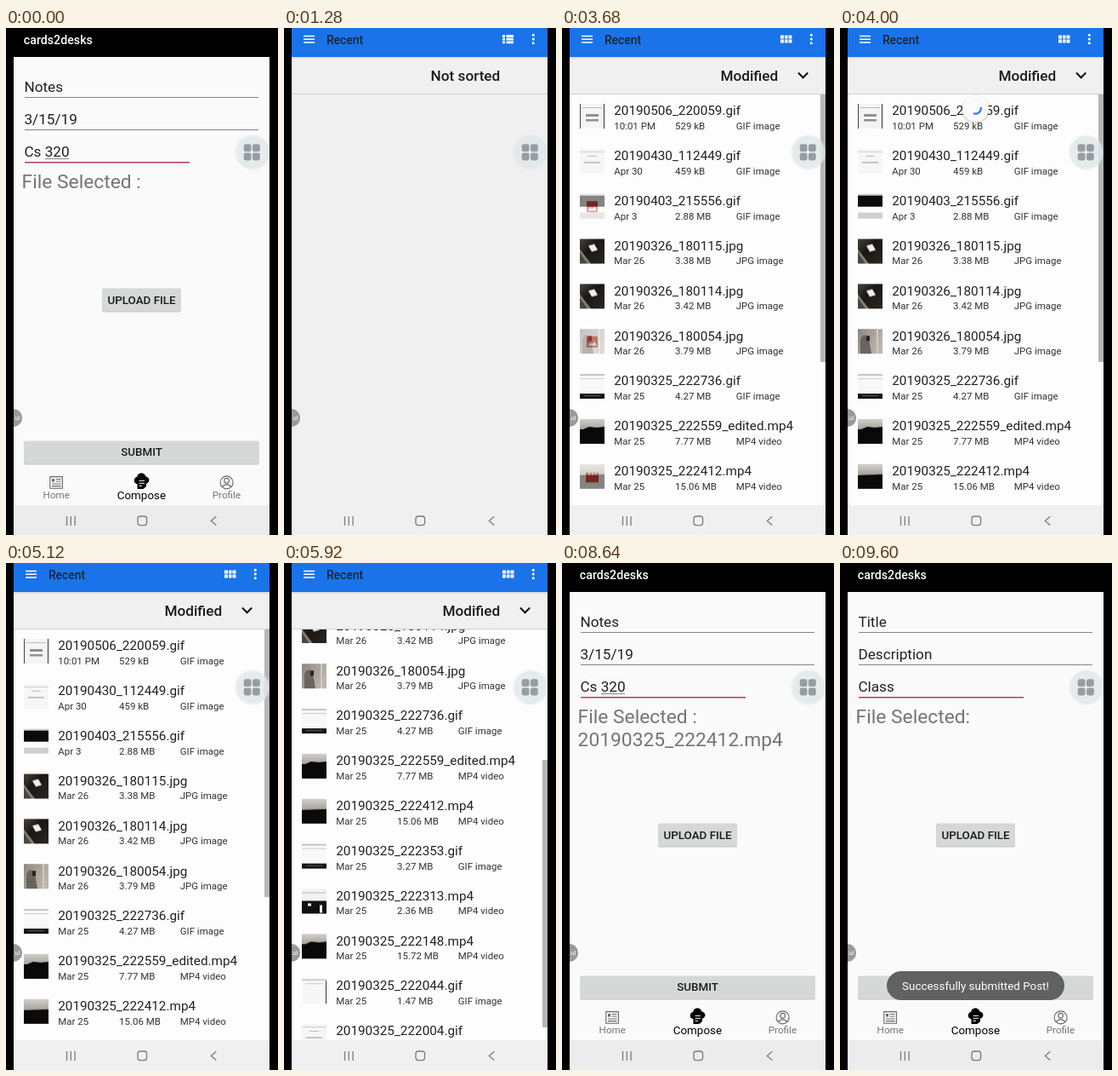
An HTML page that plays this animation: 320x595 px, repeating every 9.76 s.

```html
<!DOCTYPE html>
<html lang="en">
<head>
<meta charset="utf-8">
<title>Upload a file</title>
<style>
html, body { margin: 0; width: 100%; height: 100%; overflow: hidden; background: #000; }
svg { display: block; width: 100vw; height: 100vh; }
text { font-family: Roboto, "Noto Sans", sans-serif; white-space: pre; }
.mid { text-anchor: middle; }
.end { text-anchor: end; }
.med { font-weight: 500; }
.field { font-size: 17.2px; fill: #212121; }
.big { font-size: 22.8px; fill: #757575; }
.btn { font-size: 13.4px; font-weight: 500; fill: #1c1c1c; text-anchor: middle; }
.tab { font-size: 11.7px; fill: #757575; text-anchor: middle; }
.sort { font-size: 17.2px; font-weight: 500; fill: #1c1c1c; text-anchor: end; }
.name { font-size: 15.3px; fill: #212121; }
.meta { font-size: 11.5px; fill: #333; }

/* One loop is 61 ticks of 160 ms. */
.a { animation: 9.76s step-end infinite; animation-name: var(--k); }

@keyframes press {
  0% { opacity: 0; transform: scale(.3, 1); }
  1.63% { opacity: .08; transform: scale(.5, 1); }
  3.27% { opacity: .12; transform: scale(.8, 1); }
  4.91% { opacity: .14; transform: none; }
  6.55%, 100% { opacity: 0; }
}
@keyframes picker {
  0% { opacity: 0; transform: translateY(60px); }
  6.55% { opacity: .2; transform: translateY(40px); }
  8.19% { opacity: .45; transform: translateY(22px); }
  9.83% { opacity: .7; transform: translateY(10px); }
  11.47% { opacity: .88; transform: translateY(3px); }
  13.11% { opacity: 1; transform: none; }
  63.93% { opacity: .4; transform: none; }
  65.57%, 100% { opacity: 0; transform: none; }
}
@keyframes unsorted { 0% { opacity: 0 } 13.11% { opacity: 1 } 24.58%, 100% { opacity: 0 } }
@keyframes sorted { 0% { opacity: 0 } 24.58%, 100% { opacity: 1 } }
@keyframes rowsIcon { 0% { opacity: 1 } 26.22%, 100% { opacity: 0 } }
@keyframes gridIcon { 0% { opacity: 0 } 26.22%, 100% { opacity: 1 } }
@keyframes list { 0% { opacity: 0 } 32.78%, 100% { opacity: 1 } }
@keyframes thumb { 0% { opacity: 0 } 34.42% { opacity: .5 } 36.06%, 100% { opacity: 1 } }
@keyframes scroll {
  0% { transform: none; }
  55.73% { transform: translateY(-36px); }
  57.37% { transform: translateY(-128px); }
  59.01% { transform: translateY(-205px); }
  60.65%, 100% { transform: translateY(-235px); }
}
@keyframes bar {
  0% { opacity: 0; transform: none; }
  37.7% { opacity: 1; transform: none; }
  55.73% { opacity: 1; transform: translateY(23.5px); }
  57.37% { opacity: 1; transform: translateY(83.7px); }
  59.01% { opacity: 1; transform: translateY(134px); }
  60.65%, 100% { opacity: 1; transform: translateY(153px); }
}
@keyframes drop {
  0% { opacity: 0; transform: translateY(-32px); }
  39.34% { opacity: 1; transform: translateY(-18px); }
  40.98% { opacity: 1; transform: none; }
  42.62% { opacity: 1; transform: translateY(13px); }
  44.26% { opacity: 1; transform: translateY(20px); }
  50.81% { opacity: .8; transform: translateY(20px) scale(.55); }
  52.45%, 100% { opacity: 0; }
}
@keyframes spin { to { transform: rotate(3050deg) } }
.spin { animation: spin 9.76s steps(61, end) infinite; transform-origin: 159.3px 94px; }
@keyframes filled { 0% { opacity: 1 } 95.08%, 100% { opacity: 0 } }
@keyframes cleared { 0% { opacity: 0 } 95.08%, 100% { opacity: 1 } }
@keyframes file { 0% { opacity: 0 } 63.93% { opacity: 1 } 95.08%, 100% { opacity: 0 } }
@keyframes caret {
  0% { opacity: 0 } 65.57% { opacity: 1 } 68.85% { opacity: 0 } 73.77% { opacity: 1 }
  78.68% { opacity: 0 } 83.6% { opacity: 1 } 88.52% { opacity: 0 } 93.44% { opacity: 1 }
  95.08%, 100% { opacity: 0 }
}
@keyframes submit {
  0% { opacity: 0; transform: scale(.4, 1); }
  93.44% { opacity: .1; transform: scale(.5, 1); }
  95.08% { opacity: .12; transform: scale(.9, 1); }
  96.72%, 100% { opacity: 0; }
}
@keyframes toast { 0% { opacity: 0 } 96.72% { opacity: .55 } 98.36%, 100% { opacity: 1 } }
</style>
</head>
<body>
<svg viewBox="0 0 320 595" preserveAspectRatio="none">
  <defs>
    <clipPath id="screen"><rect x="9" width="301" height="595"/></clipPath>
    <clipPath id="body"><rect x="9" y="78" width="301" height="482"/></clipPath>
    <filter id="soft" x="-30%" y="-30%" width="160%" height="160%"><feGaussianBlur stdDeviation="1.3"/></filter>
    <linearGradient id="room" x2="1" y2="1">
      <stop stop-color="#4b443d"/><stop offset=".4" stop-color="#1b1714"/><stop offset="1" stop-color="#2a2623"/>
    </linearGradient>
    <linearGradient id="wall" x2="1" y2=".5">
      <stop stop-color="#8d8780"/><stop offset="1" stop-color="#bdb6ad"/>
    </linearGradient>
    <linearGradient id="haze" x2="0" y2="1">
      <stop stop-color="#d2d0ca"/><stop offset="1" stop-color="#a5a29b"/>
    </linearGradient>
  </defs>
  <rect width="320" height="595"/>
  <g clip-path="url(#screen)">

    <!-- Compose form -->
    <text class="med" x="20.8" y="18.5" font-size="14.2" fill="#fff">cards2desks</text>
    <rect x="9" y="34" width="301" height="526" fill="#fafafa"/>
    <rect x="9" y="560" width="301" height="35" fill="#ececec"/>
    <path d="M22 81.5H297M22 119.5H297" stroke="#858585"/>
    <path d="M22 157.8H216" stroke="#b9375f" stroke-width="1.6"/>
    <g class="a" style="--k:filled">
      <text class="field" x="21.4" y="75">Notes</text>
      <text class="field" x="21.4" y="113">3/15/19</text>
      <text class="field" x="21.4" y="151.2">Cs 320</text>
      <path d="M46 153.5H74" stroke="#8a8a8a"/>
      <text class="big" x="18.600" y="188.400">File Selected :</text>
    </g>
    <g class="a" style="--k:cleared">
      <text class="field" x="21.400" y="75">Title</text>
      <text class="field" x="21.400" y="113">Description</text>
      <text class="field" x="21.400" y="151.200">Class</text>
      <text class="big" x="18.600" y="188.400">File Selected:</text>
    </g>
    <text class="big a" style="--k:file" x="18.600" y="215.200">20190325_222412.mp4</text>
    <rect class="a" style="--k:caret" x="74.200" y="134" width="1.600" height="22" fill="#b9375f"/>

    <rect x="113" y="306.500" width="93" height="27" rx="2" fill="#c4c4c4"/>
    <rect x="113" y="305.500" width="93" height="27" rx="2" fill="#d6d7d7"/>
    <rect class="a" style="--k:press;transform-origin:160px 320px" x="113" y="305.500" width="93" height="27" rx="2"/>
    <text class="btn" x="159.500" y="324.200">UPLOAD FILE</text>
    <rect x="21" y="485.400" width="277" height="27" rx="2" fill="#c4c4c4"/>
    <rect x="21" y="484.400" width="277" height="27" rx="2" fill="#d6d7d7"/>
    <rect class="a" style="--k:submit;transform-origin:150px 498px" x="21" y="484.400" width="260" height="27" rx="2"/>
    <text class="btn" x="159.500" y="502.400">SUBMIT</text>

    <g fill="none" stroke="#666" stroke-width="1.100">
      <path d="M51.800 526.600H66.400V540.200H51.800ZM58.500 529.500H64.500M58.500 532H64.500M54 535H64.500M54 537.600H64.500"/>
      <path d="M54 530.800H57" stroke-width="3.400"/>
      <circle cx="259.600" cy="533.400" r="7.500"/>
      <circle cx="259.600" cy="531.200" r="2.800"/>
      <path d="M254.200 538.500Q259.600 532.800 265 538.500"/>
    </g>
    <circle cx="155" cy="531" r="4.300"/>
    <circle cx="159.300" cy="527.500" r="5.200"/>
    <circle cx="164.200" cy="530.600" r="4.200"/>
    <path d="M154.500 530H165V538L161.500 541H154.500Z"/>
    <path d="M156.500 531.300H163M156.500 534.300H163M156.500 537.300H160" stroke="#fff"/>
    <text class="tab" x="59.300" y="552.300">Home</text>
    <text class="tab" x="159.400" y="552.600" style="font-size:13.4px;fill:#000">Compose</text>
    <text class="tab" x="259.400" y="552.300">Profile</text>

    <!-- File picker -->
    <g class="a" style="--k:picker">
      <rect x="9" width="301" height="595" fill="#f0f0f0"/>
      <g clip-path="url(#body)">
        <g class="a" style="--k:list">
          <rect x="9" y="78" width="301" height="482" fill="#fdfdfd"/>
          <g id="rows" class="a" style="--k:scroll"></g>
          <rect class="a" style="--k:bar" x="304" y="78" width="6" height="314" fill="#b6b6b6"/>
          <g class="a" style="--k:drop;transform-origin:159.500px 95px">
            <circle cx="159.500" cy="95.500" r="16" opacity=".22" filter="url(#soft)"/>
            <circle cx="159.500" cy="94.500" r="15.500" fill="#fafafa"/>
            <g class="spin">
              <circle cx="159.300" cy="94" r="6.600" fill="none" stroke="#1a73e8" stroke-width="2.200"
                stroke-dasharray="14 60" transform="rotate(180 159.300 94)"/>
            </g>
          </g>
        </g>
      </g>
      <path d="M9 77.500H310" stroke="#d2d2d2"/>
      <rect x="9" y="34" width="301" height="2" fill="#dcdcdc"/>
      <rect x="9" width="301" height="34" fill="#1a73e8"/>
      <path d="M23 9.500H36M23 13.200H36M23 16.900H36" stroke="#fff" stroke-width="1.500"/>
      <text class="med" x="49.900" y="18.500" font-size="13.900" fill="#1b2433">Recent</text>
      <path class="a" style="--k:rowsIcon" d="M257 9.500H260M261.500 9.500H270M257 13.200H260M261.500 13.200H270M257 16.900H260M261.500 16.900H270" stroke="#fff" stroke-width="2.800"/>
      <path class="a" style="--k:gridIcon" d="M257 10.500H261M262 10.500H265.500M266.500 10.500H270.500M257 15.500H261M262 15.500H265.500M266.500 15.500H270.500" stroke="#fff" stroke-width="4"/>
      <g fill="#fff"><circle cx="293.300" cy="8.300" r="1.500"/><circle cx="293.300" cy="13" r="1.500"/><circle cx="293.300" cy="17.700" r="1.500"/></g>
      <text class="sort a" style="--k:unsorted" x="254.300" y="62">Not sorted</text>
      <g class="a" style="--k:sorted">
        <text class="sort" x="254.300" y="62">Modified</text>
        <path d="M278 52.500L283.600 58.200L289.200 52.500" fill="none" stroke="#111" stroke-width="2"/>
      </g>
    </g>

    <!-- Toast, system bar and floating handles -->
    <g class="a" style="--k:toast">
      <rect x="55" y="479" width="209" height="34" rx="17" fill="#616161"/>
      <text class="mid" x="159.500" y="501" font-size="13.400" fill="#fff">Successfully submitted Post!</text>
    </g>
    <g fill="none" stroke="#7b7b7b" stroke-width="1.300">
      <path d="M71.500 573V584M76.300 573V584M81.100 573V584M247.300 573.200L241.300 578.400L247.300 583.600"/>
      <rect x="155" y="573" width="10.600" height="10.600" rx="3"/>
    </g>
    <circle cx="290" cy="146" r="20.300" fill="#d5e2e6" opacity=".5" filter="url(#soft)"/>
    <circle cx="290" cy="146" r="19.300" fill="#e3e9eb" opacity=".7"/>
    <g fill="#979da1">
      <rect x="279.700" y="136.300" width="8.800" height="8.800" rx="2.300"/><rect x="290" y="136.300" width="8.800" height="8.800" rx="2.300"/>
      <rect x="279.700" y="146.600" width="8.800" height="8.800" rx="2.300"/><rect x="290" y="146.600" width="8.800" height="8.800" rx="2.300"/>
    </g>
    <circle cx="8.500" cy="457.500" r="10.600" fill="#9a9a9a"/>
    <text x="9" y="460" font-size="7" fill="#fff">.ul</text>
  </g>
</svg>
<script>
const PITCH = 52.85;
// Name, date, size, thumbnail style
const files = [
  ['20190506_220059.gif', '10:01 PM', '529 kB', 'form'],
  ['20190430_112449.gif', 'Apr 30', '459 kB', 'faint'],
  ['20190403_215556.gif', 'Apr 3', '2.88 MB', 'split'],
  ['20190326_180115.jpg', 'Mar 26', '3.38 MB', 'room'],
  ['20190326_180114.jpg', 'Mar 26', '3.42 MB', 'room'],
  ['20190326_180054.jpg', 'Mar 26', '3.79 MB', 'wall'],
  ['20190325_222736.gif', 'Mar 25', '4.27 MB', 'keys'],
  ['20190325_222559_edited.mp4', 'Mar 25', '7.77 MB', 'desk'],
  ['20190325_222412.mp4', 'Mar 25', '15.06 MB', 'dark'],
  ['20190325_222353.gif', 'Mar 25', '3.27 MB', 'keys'],
  ['20190325_222313.mp4', 'Mar 25', '2.36 MB', 'bars'],
  ['20190325_222148.mp4', 'Mar 25', '15.72 MB', 'desk'],
  ['20190325_222044.gif', 'Mar 25', '1.47 MB', 'page'],
  ['20190325_222004.gif', 'Mar 25', '2.10 MB', 'faint']
];

const box = (x, y, w, h, fill) => `<rect x="${x}" y="${y}" width="${w}" height="${h}" fill="${fill}"/>`;
const shape = (d, fill) => `<path d="${d}" fill="${fill}"/>`;
const rightEdge = box(28, 0, 1, 29, '#333');

// Drawn in a 29 by 29 square
const thumbs = {
  form: box(0, 0, 29, 29, '#f4f4f4') + box(0, 0, 1, 29, '#444') + rightEdge + box(3, 4, 23, 1, '#bbb') + box(7, 12, 15, 3, '#909090') + box(7, 18, 15, 2.5, '#909090'),
  faint: box(0, 0, 29, 29, '#f6f6f6') + box(0, 3, 29, 1, '#ccc') + box(9, 8, 11, 1, '#bbb') + box(5, 15, 19, 2, '#c4c4c4'),
  split: box(0, 0, 29, 29, '#fafafa') + box(0, 0, 29, 15, '#0b0b0b') + box(0, 0, 29, 2, '#ccc') + box(0, 22, 29, 7, '#d0cfcc'),
  room: box(0, 0, 29, 29, 'url(#room)') + shape('M10 8L17 6L21 13L14 15Z', '#eee') + shape('M0 12L13 29H0Z', '#85807a') + shape('M0 16L9 29H0Z', '#4a4540'),
  wall: box(0, 0, 29, 29, 'url(#wall)') + shape('M3 29V12Q8 2 13 12L16 29Z', '#6a645e') + box(10, 8, 4, 6, '#26231f') + box(22, 0, 2, 29, '#d0cac2'),
  keys: box(0, 0, 29, 29, '#f8f8f8') + box(0, 0, 29, 2, '#c4c4c4') + box(0, 5, 29, 1, '#ccc') + box(0, 23, 29, 6, '#151515') + box(5, 25, 19, 1, '#555'),
  desk: box(0, 0, 29, 29, '#090909') + shape('M0 0H29V9L20 10L11 9L4 12H0Z', 'url(#haze)'),
  dark: box(0, 0, 29, 29, '#0b0a09') + shape('M0 0H29V12L0 13Z', 'url(#haze)'),
  bars: box(0, 0, 29, 29, '#f2f2f2') + box(0, 14, 29, 15, '#101010') + box(7, 17, 4, 3, '#fff') + box(21, 19, 3, 9, '#eee') + box(0, 4, 29, 1, '#bbb'),
  page: box(0, 0, 29, 29, '#f7f7f7') + rightEdge + box(0, 0, 29, 2, '#ccc') + box(4, 5, 21, 1, '#ccc')
};

const red = '#db4437';
const icons = {
  image: box(29, 97.5, 13, 13, red) + shape('M30.500 108.500L33.500 104.500L35.500 107L38 103.500L41 108.500Z', '#fff'),
  video: box(28, 99, 15, 11.5, red) + shape('M30 98.500H32L34 102H32ZM34 98.500H36L38 102H36ZM38 98.500H40L42 102H40Z', '#fdfdfd')
};

const row = ([name, date, size, look], i) => {
  const ext = name.slice(-3).toUpperCase();
  const kind = ext === 'MP4' ? 'video' : 'image';
  return `<g transform="translate(0 ${(i * PITCH).toFixed(2)})">
    ${icons[kind]}
    <g class="a" style="--k:thumb;animation-delay:${i % 3 * 160}ms;animation-fill-mode:backwards">
      <g transform="translate(21 89)">${thumbs[look]}</g>
    </g>
    <text class="name" x="61.200" y="102.300">${name}</text>
    <text class="meta" x="61.200" y="118.900">${date}</text>
    <text class="meta" x="133" y="118.900">${size}</text>
    <text class="meta" x="204.700" y="118.900">${ext} ${kind}</text>
  </g>`;
};
document.getElementById('rows').innerHTML = files.map(row).join('');
</script>
</body>
</html>
```
